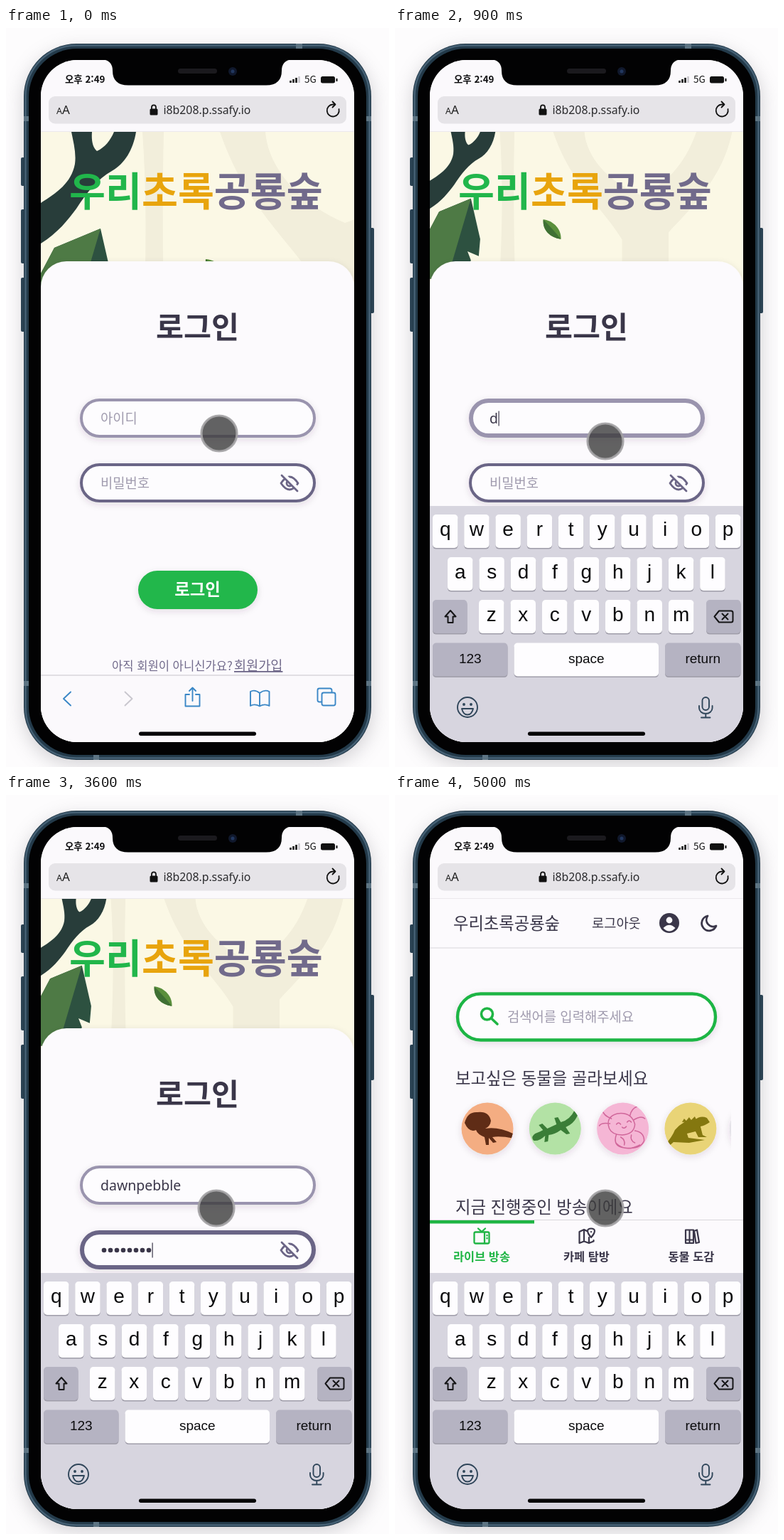
An HTML page that plays this animation: 539x1039 px, repeating every 5100 ms.

```html
<!DOCTYPE html>
<html lang="ko">
<head>
<meta charset="utf-8">
<title>로그인</title>
<style>
html, body { margin: 0; width: 100%; height: 100%; overflow: hidden; background: #fdfcfd; }
svg { display: block; width: 100%; height: 100%; }
text { font-family: "Noto Sans CJK KR", "Noto Sans CJK", sans-serif; fill: #3a3649; }
.m { font-weight: 500; }
.b { font-weight: 700; }
.mid { text-anchor: middle; }
.hint { fill: #a09bae; font-weight: 500; font-size: 18.8px; }
.typed { font: 500 19.5px "Noto Sans", sans-serif; }
.key { font-family: "Liberation Sans", Arial, sans-serif; fill: #0b0b0d; text-anchor: middle; }
.line { fill: none; stroke-linecap: round; stroke-linejoin: round; }
</style>
</head>
<body>
<svg viewBox="0 0 539 1039">
  <defs>
    <clipPath id="screen"><rect x="49" y="45" width="441" height="959" rx="51"/></clipPath>
    <clipPath id="disc"><circle r="36.5"/></clipPath>
    <clipPath id="row"><rect x="70" y="410" width="403" height="120"/></clipPath>
    <filter id="blur" x="-20%" y="-20%" width="140%" height="140%"><feGaussianBlur stdDeviation="13"/></filter>
    <filter id="soft" x="-20%" y="-40%" width="140%" height="190%"><feDropShadow dx="0" dy="3" stdDeviation="5" flood-color="#3a3649" flood-opacity=".14"/></filter>
  </defs>

  <!-- phone body -->
  <rect x="24" y="30" width="492" height="1006" rx="74" fill="#8b8890" opacity=".36" filter="url(#blur)"/>
  <g fill="#2a4253">
    <rect x="21" y="182" width="8" height="40" rx="2"/>
    <rect x="21" y="255" width="8" height="76" rx="2"/>
    <rect x="21" y="351" width="8" height="76" rx="2"/>
    <rect x="510" y="281" width="8" height="120" rx="2"/>
  </g>
  <rect x="25" y="22" width="489" height="1007" rx="74" fill="#233a4a"/>
  <rect x="27.5" y="24.5" width="484" height="1002" rx="71.5" fill="none" stroke="#466175" stroke-width="2.4"/>
  <g fill="#5d7483">
    <rect x="408" y="22" width="9" height="7"/><rect x="123" y="1022" width="8" height="7"/>
    <rect x="25" y="124" width="7" height="7"/><rect x="507" y="124" width="7" height="7"/>
    <rect x="25" y="918" width="7" height="7"/><rect x="507" y="918" width="7" height="7"/>
  </g>
  <rect x="32" y="29" width="475" height="993" rx="68" fill="#020203"/>

  <g clip-path="url(#screen)">
    <rect x="49" y="45" width="441" height="959" fill="#fcfafd"/>

    <g id="login">
      <g id="forest">
        <rect width="660" height="764" fill="#fbf8e5"/>
        <g fill="#f2eedb">
          <path d="M143 0H173Q170 130 174 290H143Q152 130 143 0Z"/>
          <path d="M252 0H316C320 50 362 100 428 128C480 110 520 70 545 0H618C600 90 540 150 488 205V290H393V220C350 150 290 110 252 0Z"/>
        </g>
        <path fill="#283d3a" d="M0 100C22 86 43 72 48 45C50 30 46 15 43 0H72C71 12 73 22 79 27C90 22 98 12 103 0H134C130 25 118 45 100 55C80 66 65 85 50 108C38 124 24 142 0 157Z"/>
        <path fill="#2d5140" d="M84 136L103 219L100 254L77 244L84 262L70 300H0V199L19 163Z"/>
        <path fill="#4e7a45" d="M84 136L45 268L30 300H0V199L19 163Z"/>
        <path fill="#5a8f3c" d="M232 179C248 180 269 195 268 219C246 216 230 201 232 179Z"/>
        <path fill="#3f7034" d="M232 179Q249 196 268 219C246 216 230 201 232 179Z"/>
      </g>
      <g class="b" font-size="55.4">
        <text class="b" x="89" y="250"><tspan fill="#21b64b">우리</tspan><tspan fill="#e8a40c">초록</tspan><tspan fill="#716a8b">공룡숲</tspan></text>
      </g>
      <path d="M49 1010V364a36 36 0 0 1 36-36H454a36 36 0 0 1 36 36V1010Z" fill="#fcfafd" filter="url(#soft)"/>
      <text class="b mid" x="269.5" y="436" font-size="42.4">로그인</text>

      <g filter="url(#soft)"><rect id="idBox" fill="#fdfcfe" stroke="#9a94ae"/></g>
      <text id="idHint" class="hint" x="133" y="556">아이디</text>
      <text id="idText" class="typed" x="133" y="556"></text>
      <g filter="url(#soft)"><rect id="pwBox" fill="#fdfcfe" stroke="#6b6586"/></g>
      <text id="pwHint" class="hint" x="133" y="647">비밀번호</text>
      <g id="dots" fill="#3a3649"></g>
      <rect id="caret" width="1.2" height="21" fill="#3a3649"/>
      <g class="line" stroke="#6b6586" stroke-width="2.8">
        <path d="M387 640Q399 622 411 640Q399 658 387 640Z"/>
        <circle cx="399" cy="640" r="4"/>
        <path d="M391 628L412 649" stroke="#fdfcfe" stroke-width="5"/>
        <path d="M388 629L410 651"/>
      </g>

      <rect x="186" y="763" width="168" height="54" rx="27" fill="#20b74b" filter="url(#soft)"/>
      <text class="b mid" x="269.5" y="798" font-size="23.4" style="fill:#fff">로그인</text>
      <text class="m" x="149" y="903" font-size="16.6" style="fill:#716a8b">아직 회원이 아니신가요?</text>
      <text class="m" x="321" y="903" font-size="18.6" style="fill:#716a8b" text-decoration="underline">회원가입</text>
    </g>

    <g id="home">
      <text class="m" x="82" y="189" font-size="23.3">우리초록공룡숲</text>
      <text class="m" x="277" y="187" font-size="18.7">로그아웃</text>
      <circle cx="386" cy="180" r="14" fill="#3a3649"/>
      <circle cx="386" cy="176" r="4.4" fill="#fcfafd"/>
      <path d="M377.500 187Q386 178.500 394.500 187Q386 196 377.500 187Z" fill="#fcfafd"/>
      <path class="line" d="M440 170A10.500 10.500 0 1 0 452 184A9.500 9.500 0 0 1 440 170Z" stroke="#3a3649" stroke-width="2.8"/>
      <path d="M49 215H490" stroke="#e4e2e7" stroke-width="1.6"/>

      <g id="content">
        <rect x="88" y="279.500" width="363" height="65" rx="32.5" fill="#fdfcfe" stroke="#1fb544" stroke-width="4.4" filter="url(#soft)"/>
        <g class="line" stroke="#1fb544" stroke-width="3.6"><circle cx="129.500" cy="308" r="8"/><path d="M136 314.500L144 322"/></g>
        <text class="hint" x="158" y="318.500">검색어를 입력해주세요</text>
        <text x="85" y="406.500" font-size="23.4">보고싶은 동물을 골라보세요</text>
        <g id="animals" clip-path="url(#row)"></g>
        <text x="85" y="588" font-size="23.4">지금 진행중인 방송이에요</text>
      </g>

      <rect x="49" y="597" width="441" height="80" fill="#fcfafd"/>
      <path d="M49 597.500H490" stroke="#d9d7dc" stroke-width="1.2"/>
      <rect x="49" y="598" width="147" height="4.500" fill="#1fb544"/>
      <g class="line" stroke="#1fb544" stroke-width="2.3">
        <rect x="111.500" y="614.500" width="21" height="16" rx="2"/><path d="M117 609.500L122 614L127 609.500M126 615V630M129.500 619v.5M129.500 623v.5"/>
      </g>
      <g class="line" stroke="#3a3649" stroke-width="2.2">
        <path d="M270 613L266 611L259.500 614V630L266 627.500L273 630L279.500 627.500V626M266 611V627M273 622V630"/>
        <path d="M276 622C268 613 271 609.500 276 609.500S284 613 276 622Z"/><path d="M276 614v.3"/>
        <path d="M409 611.500H414.500V630H409ZM414.500 611.500H420V630H414.500ZM421 613L425 611.500L428 629L423.500 630ZM409 625.500H420"/>
      </g>
      <g class="mid" font-size="16.4">
        <text class="b" x="122" y="655" style="fill:#1fb544">라이브 방송</text>
        <text class="b" x="269.500" y="655">카페 탐방</text>
        <text class="b" x="417" y="655">동물 도감</text>
      </g>
    </g>

    <!-- status and address bars -->
    <rect x="49" y="45" width="441" height="101" fill="#fbf9fc"/>
    <path d="M49 145.500H490" stroke="#ebe8ed"/>
    <text class="b" x="83" y="77" font-size="13.4" style="fill:#101012">오후 2:49</text>
    <path d="M400.500 77v-3M404.500 77v-5M408.500 77v-7" stroke="#111" stroke-width="2.6"/><path d="M412.500 77v-9" stroke="#c4c2c8" stroke-width="2.4"/>
    <text class="m" x="420" y="77" font-size="13.500" style="fill:#111">5G</text>
    <rect x="443" y="68" width="20" height="9.500" rx="2.500" fill="#111"/><rect x="464.500" y="71" width="2" height="4" fill="#111"/>
    <rect x="60" y="96" width="419" height="38.500" rx="9" fill="#e6e4e8"/>
    <text x="71" y="121" style="font-family:'Noto Sans',sans-serif;fill:#222"><tspan font-size="12.500">A</tspan><tspan font-size="17">A</tspan></text>
    <rect x="202.500" y="113.500" width="11" height="9" rx="1.5" fill="#111"/>
    <path class="line" d="M205 114V111.500a3 3.200 0 0 1 6 0V114" stroke="#111" stroke-width="1.8"/>
    <text x="221.500" y="121" font-size="15.8" style="font-family:'Noto Sans',sans-serif;fill:#2a2a2d">i8b208.p.ssafy.io</text>
    <path class="line" d="M468.500 114A8.500 8.500 0 1 1 460 107.500H463M459.500 103.500L463.500 107.500L459.500 111.500" stroke="#111" stroke-width="1.8"/>

    <g id="toolbar">
      <rect x="49" y="910" width="441" height="94" fill="#fbf9fc"/>
      <path d="M49 910H490" stroke="#d8d6db" stroke-width="1.4"/>
      <g class="line" stroke="#3a87c6" stroke-width="1.9">
        <path d="M91 933.500L81 943L91 952.500"/>
        <path d="M167.500 933.500L177.500 943L167.500 952.500" stroke="#c9c7ce"/>
        <path d="M258 937H252.500V953.500H272.500V937H267M262.500 946V927.500M258 932L262.500 927.500L267 932"/>
        <path d="M357 935Q350 929.500 344 933V953Q350 949.500 357 953.500Q364 949.500 370.500 953V933Q364 929.500 357 935V953"/>
        <path d="M443.500 947.500H441a2.500 2.500 0 0 1-2.500-2.500V931a2.500 2.500 0 0 1 2.500-2.500H456a2.500 2.500 0 0 1 2.500 2.500V934"/>
        <rect x="444.500" y="934.500" width="19" height="18" rx="2.500"/>
      </g>
    </g>

    <g id="keyboard">
      <rect x="49" y="0" width="441" height="420" fill="#d7d5df"/>
      <g id="keys"></g>
      <g class="line" stroke="#151517" stroke-width="2">
        <path d="M78 147L70.500 155.500H74.500V164H81.500V155.500H85.500Z"/>
        <path d="M456 147.500H473a2.500 2.500 0 0 1 2.500 2.500V161a2.500 2.500 0 0 1-2.500 2.500H456L449.500 155.500ZM460.500 151.500L468.500 159.500M468.500 151.500L460.500 159.500"/>
      </g>
      <g class="line" stroke="#30465a" stroke-width="1.9">
        <circle cx="102" cy="283" r="14"/><path d="M94 285H110Q108 293.500 102 293.500T94 285Z"/>
        <circle cx="97" cy="279" r="1"/><circle cx="107" cy="279" r="1"/>
        <rect x="432.500" y="269" width="9.500" height="18" rx="4.750"/><path d="M428 281V284a9.300 8 0 0 0 18.600 0V281M437.300 292V297.500M431 297.500H443.500"/>
      </g>
    </g>
    <rect x="187" y="989.500" width="165" height="5.500" rx="2.750" fill="#050506"/>
  </g>

  <path d="M136 44H402Q388 46 388 60Q388 80.500 366 80.500H172Q150 80.500 150 60Q150 46 136 44Z" fill="#020203"/>
  <rect x="242" y="57" width="55" height="7" rx="3.500" fill="#1b1a1e"/>
  <circle cx="319" cy="61" r="6" fill="#10182c"/><circle cx="319" cy="61" r="2.500" fill="#22375f"/>

  <circle id="pointer" r="25" fill="#3c3c3c" fill-opacity=".8" stroke="#a5a4a6" stroke-opacity=".9" stroke-width="3.2"/>
</svg>
<script>
const LOOP = 5100, STEP = 100;
const USER = "dawnpebble";
const FULL_TOP = 672;
// [time, keyboard distance below its resting place]
const RISE = [[0, 400], [100, 150], [200, 41], [300, 12], [400, 4], [500, 1], [600, 0]];
// [time, characters shown]
const ID_STEPS = [[0, 0], [900, 1], [1000, 2], [1100, 3], [1200, 4], [1500, 5], [1600, 6], [1700, 7], [1800, 8], [1900, 9], [2000, 10]];
const PW_FOCUS = 2500, PW_START = 2700, HOME_AT = 4500, CONTENT_AT = 4800;

const $ = id => document.getElementById(id);
const show = (id, on) => $(id).setAttribute("visibility", on ? "inherit" : "hidden");
const at = (table, t) => table.reduce((value, [start, v]) => t >= start ? v : value, table[0][1]);

function add(parent, tag, attrs, text = "") {
  const el = document.createElementNS("http://www.w3.org/2000/svg", tag);
  for (const name in attrs) el.setAttribute(name, attrs[name]);
  el.textContent = text;
  parent.append(el);
  return el;
}

function addKey(x, y, w, label, size = 28, fill = "#fefdff") {
  add($("keys"), "rect", { x, y: y + 1.6, width: w, height: 47, rx: 5, fill: "#9f9da9" });
  add($("keys"), "rect", { x, y, width: w, height: 47, rx: 5, fill });
  add($("keys"), "text", { class: "key", x: x + w / 2, y: y + (size > 20 ? 29.5 : 28.5), "font-size": size }, label);
}

const GRAY = "#b5b3c2";
[["qwertyuiop", 53, 12, 44.2], ["asdfghjkl", 74, 72, 44.4], ["zxcvbnm", 118, 132, 44.5]]
  .forEach(([letters, x, y, pitch]) => [...letters].forEach((c, i) => addKey(x + i * pitch, y, 35.5, c)));
addKey(53, 132, 48.5, "", 28, GRAY);
addKey(438, 132, 48.5, "", 28, GRAY);
addKey(53, 192.5, 105.5, "123", 19, GRAY);
addKey(167.5, 192.5, 203.5, "space", 19);
addKey(380, 192.5, 106.5, "return", 19, GRAY);

const dots = Array.from({ length: 8 }, (_, i) =>
  add($("dots"), "circle", { cx: 138 + i * 9, cy: 640, r: 3.3 }));

// disc colour, silhouette colour, silhouette, outline only
const ANIMALS = [
  ["#f4ad82", "#5f2c16", "M-32-8Q-28-24-14-23Q2-25 5-11Q4-3-3 0Q16-3 38 8V14Q18 10 7 12L13 19L8 20L2 13L2 23L-2 23L-4 12Q-14 8-16 2Q-26 6-32-8Z"],
  ["#b3e2a5", "#3a7d37", "M34-26Q30-8 15-2L21 7L16 8L8 2Q0 8-9 9L-10 18L-15 19L-14 10Q-22 18-30 17Q-35 12-28 7Q-20 4-17 2L-23-5L-18-7L-11 0L2-6L-1-15L4-16L8-9Q21-12 28-27Z"],
  ["#f5b6d5", "#d0669a", "M-19 0Q-25-16-8-21Q12-24 17-6Q16 8-1 9Q-15 9-19 0ZM-16-14Q-27-18-29-26M-18-7Q-30-9-33-4M10-18Q12-28 20-31M15-12Q26-19 31-14M-9-6q3-4 6 0M6-9q3-4 6 0M-1-2q3 3 6-1M-9 8Q-15 25 2 27Q25 30 30 17Q30 5 17 3M-3 12q7 4 5 11M12 9q-2 8 5 11M-10 20Q4 34 24 23", true],
  ["#e9d477", "#84770f", "M-36 23Q-26 12-22 2Q-8-14 6-12Q14-19 23-15L27-9Q20-4 14-3L17 9L23 12L11 12L7 4L-5 7L-3 13L20 16L-2 20L-24 19L-34 28ZM-12-9l3-5 3 3 4-5 3 4 5-5 3 6z"],
  ["#e4e2e8", "#e4e2e8", ""]
];
ANIMALS.forEach(([disc, ink, d, outline], i) => {
  const g = add($("animals"), "g", { transform: `translate(${130 + i * 95.3 - (i === 4 ? 4 : 0)} 469)` });
  add(g, "circle", { r: 36.5, fill: disc, filter: "url(#soft)" });
  add(g, "path", outline
    ? { d, class: "line", stroke: ink, "stroke-width": 1.5, "clip-path": "url(#disc)" }
    : { d, fill: ink, "clip-path": "url(#disc)" });
});

function setField(id, top, focused) {
  const w = focused ? 6 : 4;
  const attrs = { x: 104 + w / 2, y: top + w / 2, width: 332 - w, height: 55 - w, rx: 27.5 - w / 2, "stroke-width": w };
  for (const name in attrs) $(id).setAttribute(name, attrs[name]);
}

function render(time) {
  const t = Math.floor(time / STEP) * STEP;
  const typing = t >= STEP;
  const top = FULL_TOP + at(RISE, t);
  $("keyboard").setAttribute("transform", `translate(0 ${top})`);
  show("keyboard", typing);
  show("toolbar", !typing);

  // the forest always fits the height left above the keyboard
  const viewBottom = Math.min(top, 910);
  $("forest").setAttribute("transform", `translate(49 146) scale(${(viewBottom - 146) / 764})`);

  show("login", t < HOME_AT);
  show("home", t >= HOME_AT);
  show("content", t >= CONTENT_AT);

  const idCount = at(ID_STEPS, t);
  const onPassword = t >= PW_FOCUS;
  const pwCount = Math.max(0, Math.min(8, (t - PW_START) / STEP + 1));
  setField("idBox", 521, typing && !onPassword);
  setField("pwBox", 612, onPassword);
  $("idText").textContent = USER.slice(0, idCount);
  show("idHint", !idCount);
  show("pwHint", !pwCount);
  dots.forEach((dot, i) => dot.setAttribute("visibility", i < pwCount ? "inherit" : "hidden"));

  const idWidth = idCount ? $("idText").getComputedTextLength() : 0;
  $("caret").setAttribute("x", onPassword ? 133.5 + pwCount * 9 : 133.5 + idWidth);
  $("caret").setAttribute("y", onPassword ? 629.5 : 538.5);
  show("caret", typing);

  $("pointer").setAttribute("cx", t < 700 ? 300 : 296);
  $("pointer").setAttribute("cy", t < 700 ? 570 : 581);
}

const start = performance.now();
function tick() {
  render((performance.now() - start) % LOOP);
  requestAnimationFrame(tick);
}
tick();
</script>
</body>
</html>
```
